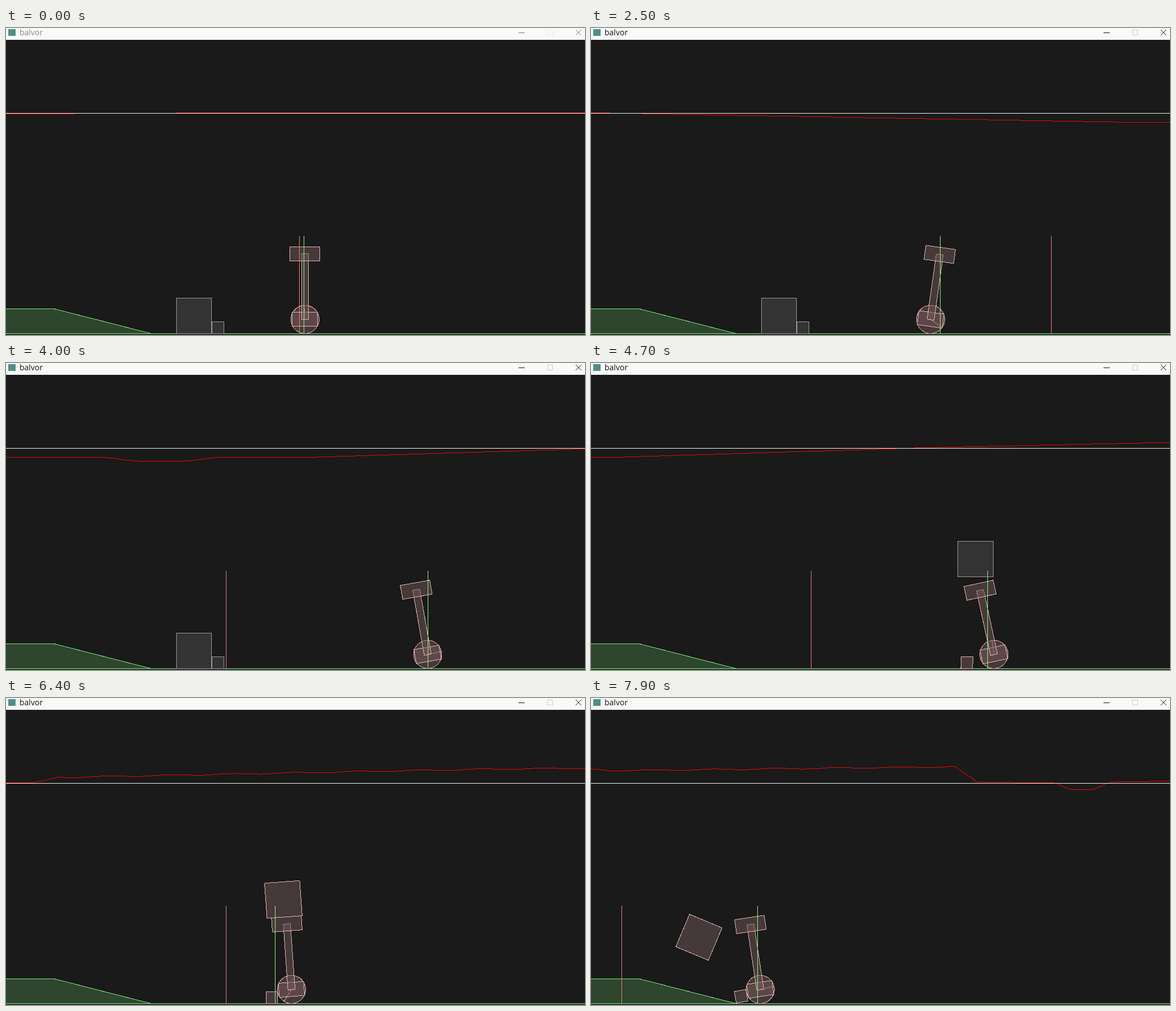
These frames come from a looping animation (1027x545 px, 8 s). An HTML page:

```html
<!DOCTYPE html>
<html lang="en">
<head>
<meta charset="utf-8">
<title>balvor</title>
<style>
  html, body { margin: 0; width: 100%; height: 100%; overflow: hidden; background: #1a1a1a; }
  svg { display: block; width: 1027px; height: 545px; }
  .fixed { fill: #2d462d; stroke: #80e680; }
  .awake { fill: rgba(115, 89, 89, .5); stroke: #e6b3b3; }
  .asleep { fill: rgba(77, 77, 77, .5); stroke: #999; }
  text { font: 14px "Open Sans", "Noto Sans", sans-serif; }
</style>
</head>
<body>
<svg viewBox="0 0 1027 545" shape-rendering="crispEdges">
  <rect width="1027" height="545" fill="#1a1a1a"/>
  <rect y="543" width="1027" height="2" fill="#233223"/>
  <path class="fixed" d="M-2 498.5H85.5L257.5 542.5H-2Z"/>
  <path d="M0 542.5H1027" stroke="#80e680"/>

  <rect id="crate" x="-31.25" y="-31.25" width="62.5" height="62.5"/>
  <rect id="block" x="-10.4" y="-10.4" width="20.8" height="20.8"/>

  <g id="wheel" class="awake">
    <circle r="25"/>
    <path d="M0 0H25"/>
  </g>
  <g id="body" class="awake">
    <rect x="-22.5" y="-12.5" width="45" height="25"/>
    <rect x="-6.25" y="-116.5" width="12.5" height="117"/>
    <rect x="-26.5" y="-129" width="53" height="25"/>
  </g>

  <path id="goal" stroke="#f57c7c" d="M.5 369V542"/>
  <path id="lead" stroke="#80ff80" d="M.5 369V542"/>
  <polyline id="trace" fill="none" stroke="#f00010"/>
  <path d="M0 151.5H1027" stroke="#f2f2f2"/>

  <rect width="1027" height="21" fill="#f9f9f9"/>
  <rect x="4" y="2" width="13" height="12" fill="#4d8f86"/>
  <text id="name" x="24" y="13">balvor</text>
  <path id="min" d="M909 8.5H920"/>
  <rect id="max" x="960.5" y="3.5" width="9" height="9" fill="none"/>
  <path id="close" d="M1010.5 3L1020.5 13M1020.5 3L1010.5 13" shape-rendering="auto"/>
</svg>
<script>
const LOOP = 8000, STEP = 100, WIDTH = 1027;
const AXLE = 517.3, RADIUS = 25, SEAT = 160.25;
const DEG = Math.PI / 180;
const el = id => document.getElementById(id);
const clamp = v => Math.max(0, Math.min(1, v));
const mix = (a, b, p) => a + (b - a) * p;
const blend = (from, to, weights) => from.map((v, i) => mix(v, to[i], weights[i]));

// Time, wheel position, lean in degrees
const poses = [
  [0, 530.4, 0], [700, 528, 0], [1000, 515.7, 7.1], [1300, 517, 9],
  [2500, 602.4, 8], [2900, 659, 5], [3400, 715.4, -7.6], [3985, 748, -10],
  [4700, 714.7, -12.2], [5000, 683, -7], [6400, 506.4, -4.1],
  [7400, 367, -4], [7650, 313, -2], [7900, 300.2, -8.6]];

// Distance along the graph, drive level
const drive = [
  [0, 1.2], [460, -1.4], [1650, -1.5], [2600, 15.5], [2900, 15.5], [3288, 15.5],
  [3823, -1], [4270, -10.8], [4440, -1], [4490, -1.5], [4530, -10.5], [5282, -25],
  [5467, -27], [5540, -22.5], [6150, -29.5], [6190, -2], [6320, -1], [6530, -4]];

function find(keys, t) {
  let i = 0;
  while (i < keys.length - 2 && keys[i + 1][0] <= t) i++;
  return i;
}

function linear(keys, t) {
  const i = find(keys, t), [a, va] = keys[i], [b, vb] = keys[i + 1];
  return mix(va, vb, clamp((t - a) / (b - a)));
}

// Hermite curve through one column of the keys
function smooth(keys, t, col) {
  const i = find(keys, t), span = keys[i + 1][0] - keys[i][0];
  const slope = j => {
    const a = keys[Math.max(0, j - 1)], b = keys[Math.min(keys.length - 1, j + 1)];
    return (b[col] - a[col]) / (b[0] - a[0]) * span;
  };
  const p = clamp((t - keys[i][0]) / span), q = 1 - p;
  return keys[i][col] * q * q * (1 + 2 * p) + keys[i + 1][col] * p * p * (3 - 2 * p)
    + slope(i) * p * q * q - slope(i + 1) * p * p * q;
}

const wheelX = t => smooth(poses, t, 1);
const lean = t => smooth(poses, t, 2);
const scroll = t => .605 * Math.min(t, 1000) + .71 * Math.max(0, t - 1000);
const bump = (u, center, height, width) => height * Math.exp(-(((u - center) / width) ** 4));

function signal(u) {
  const loaded = u > 4530 && u < 6150;
  const ripple = loaded ? -Math.cos((u - 4620) / 110 * 2 * Math.PI) : 0;
  return linear(drive, u) + ripple
    + bump(u, 1470, -3.5, 36) + bump(u, 3010, 7.5, 80) + bump(u, 6376, 13, 38);
}

function place(id, x, y, angle = 0) {
  el(id).setAttribute("transform", `translate(${x.toFixed(2)} ${y.toFixed(2)}) rotate(${angle.toFixed(2)})`);
}

// Pose of the crate while it rests on the rider's head
function riding(t) {
  const a = lean(t), s = Math.sin(a * DEG), c = Math.cos(a * DEG);
  return [wheelX(t) - 3 * c + SEAT * s, AXLE - 3 * s - SEAT * c, a];
}

function cratePose(t) {
  if (t < 4700) return [333.4, 511, 0];
  if (t < 5000) {
    const p = ((t - 4700) / 300) ** 2;
    return blend([682.2, 348, 0], riding(t), [p, p, p]);
  }
  if (t < 7300) return riding(t);
  const p = (t - 7300) / 600;
  return blend(riding(7300), [191.5, 424.8, -67.2], [p ** 1.3, p ** 2, p ** 1.5]);
}

function blockPose(t, x) {
  if (t < 4400) return [376.2, 531.9, 0];
  const tip = clamp((t - 7600) / 300);
  return [Math.min(666.7, x - 35 + tip), 531.9 - 2.4 * tip, t < 4900 ? 2 : -10 * tip];
}

function drawBar(active) {
  el("name").setAttribute("fill", active ? "#111" : "#888");
  el("min").setAttribute("stroke", active ? "#111" : "#777");
  el("max").setAttribute("stroke", active ? "#ccc" : "#eaeaea");
  el("close").setAttribute("stroke", active ? "#111" : "#777");
}

function drawTrace(from) {
  let points = "";
  for (let x = 0; x <= WIDTH + 3; x += 4) {
    points += `${x},${Math.round(151 + signal(from + x)) + .5} `;
  }
  el("trace").setAttribute("points", points);
}

function draw(t) {
  const x = wheelX(t), from = scroll(t);
  drawBar(t >= 100);
  drawTrace(from);

  // The spoke rolls with the wheel and slips a little over time
  place("wheel", x, AXLE, (x - 530) / RADIUS / DEG - 95 - .014 * t);
  place("body", x, AXLE, lean(t));
  place("crate", ...cratePose(t));
  place("block", ...blockPose(t, x));
  el("crate").setAttribute("class", t <= 4700 ? "asleep" : "awake");
  el("block").setAttribute("class", t < 4400 ? "asleep" : "awake");

  const goal = t < 700 ? 520 : t < 2800 ? 816 : t < 7600 ? 390 : 54;
  place("goal", goal, 0);
  place("lead", Math.floor(x + 1.1 * signal(from + WIDTH)), 0);
}

const start = performance.now();
function tick() {
  const t = (performance.now() - start) % LOOP;
  draw(Math.floor(t / STEP) * STEP);
  requestAnimationFrame(tick);
}
tick();
</script>
</body>
</html>
```
